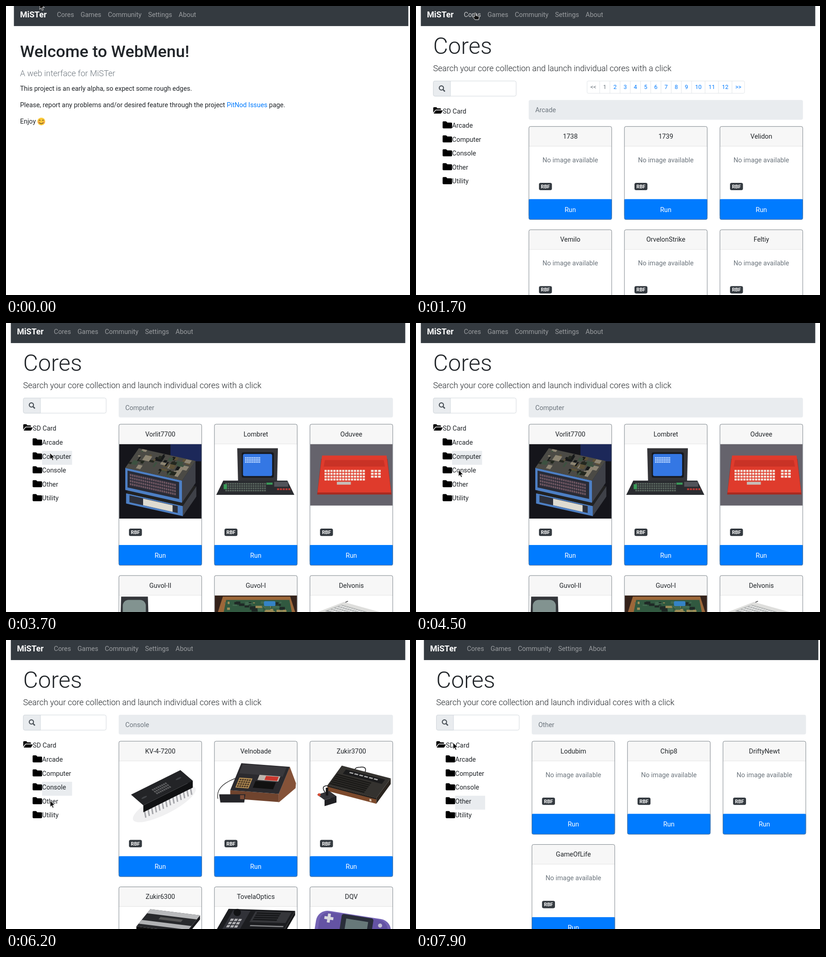
These frames come from a looping animation (884 by 634 pixels, 8000 ms). An HTML page:

```html
<!DOCTYPE html>
<html lang="en">
<head>
<meta charset="utf-8">
<title>WebMenu</title>
<style>
html, body { margin: 0; width: 100%; height: 100%; overflow: hidden; background: #fff; }
svg { display: block; }
text { font: 16px Roboto, sans-serif; fill: #212529; white-space: pre; }
.mid { text-anchor: middle; }
.muted { fill: #6c757d; }
.link { fill: #007bff; }
.white { fill: #fff; }
.brand { font-size: 20px; font-weight: 700; fill: #fff; }
.nav { fill: rgba(255,255,255,.5); }
.h1 { font-size: 40px; font-weight: 500; }
.display { font-size: 56px; font-weight: 300; }
.lead { font-size: 20px; font-weight: 300; }
.badge { font-size: 12px; font-weight: 700; fill: #fff; }
.small { font-size: 14px; }

.page, .hover, #cursor, #arrow, #hand { animation: 8s step-end infinite; }
.page { visibility: hidden; }
#home { animation-name: home; }
#arcade { animation-name: arcade; }
#computer { animation-name: computer; }
#console { animation-name: console; }
#other { animation-name: other; }
.hover { animation-name: hover; }
#cursor { animation-name: move; }
#arrow { animation-name: arrow; }
#hand { animation-name: hand; }

@keyframes home { 0% { visibility: visible } 21.25%, to { visibility: hidden } }
@keyframes arcade { 0% { visibility: hidden } 21.25% { visibility: visible } 46.25%, to { visibility: hidden } }
@keyframes computer { 0% { visibility: hidden } 46.25% { visibility: visible } 62.5%, to { visibility: hidden } }
@keyframes console { 0% { visibility: hidden } 62.5% { visibility: visible } 81.25%, to { visibility: hidden } }
@keyframes other { 0% { visibility: hidden } 81.25%, to { visibility: visible } }
@keyframes hover { 0% { fill: rgba(255,255,255,.5) } 13.75% { fill: rgba(255,255,255,.75) } 45%, to { fill: rgba(255,255,255,.5) } }
@keyframes arrow { 0% { visibility: visible } 13.75% { visibility: hidden } 27.5%, to { visibility: visible } }
@keyframes hand { 0% { visibility: hidden } 13.75% { visibility: visible } 27.5%, to { visibility: hidden } }
@keyframes move {
  0%, 7.5% { transform: translate(73.5px, -7px); animation-timing-function: steps(7) }
  16.25%, 26.25% { transform: translate(129.5px, 15px); animation-timing-function: steps(3) }
  30%, 31.25% { transform: translate(107px, 165px); animation-timing-function: steps(6) }
  38.75% { transform: translate(95.5px, 281px) }
  41.25%, 50% { transform: translate(96px, 285px); animation-timing-function: steps(3) }
  53.75% { transform: translate(92.5px, 320px) }
  56.25%, 67.5% { transform: translate(93px, 322px); animation-timing-function: steps(4) }
  72.5% { transform: translate(91.5px, 330px); animation-timing-function: steps(4) }
  77.5%, 90% { transform: translate(96.5px, 352px); animation-timing-function: steps(5) }
  96.25% { transform: translate(75.5px, 242px); animation-timing-function: steps(2) }
  98.75%, to { transform: translate(81px, 225px) }
}
</style>
</head>
<body>
<svg id="stage" width="884" height="634" viewBox="0 0 884 634"></svg>
<script>
// The page is laid out at 960 wide, then scaled onto the stage.
const SCALE = 0.899, TOP = -6.3, NARROW = 10.6, WIDE = 17.3;
const COL = 232.5, CARD = 202.5, MAIN = 262.5, BODY = 189.5;

const text = (x, y, s, cls = '') => `<text x="${x}" y="${y}" class="${cls}">${s}</text>`;
const bar = (x, y, w, h, fill, rx = 0) => `<rect x="${x}" y="${y}" width="${w}" height="${h}" rx="${rx}" fill="${fill}"/>`;
const frame = (x, y, w, h, fill, stroke, rx = 4) =>
  `<rect x="${x + .5}" y="${y + .5}" width="${w - 1}" height="${h - 1}" rx="${rx}" fill="${fill}" stroke="${stroke}"/>`;
const path = (d, fill, more = '') => `<path d="${d}" fill="${fill}" ${more}/>`;
const line = (d, color, w = 1) => path(d, 'none', `stroke="${color}" stroke-width="${w}"`);
const poly = (pts, fill) => `<polygon points="${pts.join(' ')}" fill="${fill}"/>`;
const dot = (x, y, r, fill) => `<circle cx="${x}" cy="${y}" r="${r}" fill="${fill}"/>`;
const repeat = (n, f) => Array.from({ length: n }, (_, i) => f(i)).join('');
const add = (a, b) => [a[0] + b[0], a[1] + b[1]];

let seed = 7;
const random = () => (seed = seed * 16807 % 2147483647) / 2147483647;

// --- Page parts ---

const navbar = () => bar(0, 0, 960, 56, '#343a40') + text(15, 35, 'MiSTer', 'brand') +
  text(104.8, 34, '<tspan class="hover">Cores</tspan>' +
    ['Games', 'Community', 'Settings', 'About'].map(s => `<tspan dx="16">${s}</tspan>`).join(''), 'nav');

const page = (id, left, content) => `<g class="page" id="${id}">` +
  `<g transform="translate(${left} ${TOP}) scale(${SCALE})">${navbar()}${content}</g></g>`;

const FOLDER = 'M2 0H8.5L11.5 2.9H21Q23 2.9 23 4.9V15.3Q23 17.3 21 17.3H2Q0 17.3 0 15.3V2Q0 0 2 0Z';
const OPEN = 'M0 13.5V2Q0 0 2 0H7.6L10 2.6H17Q18.8 2.6 18.8 4.5V6.1H6.7Q4.8 6.1 3.8 7.8Z' +
  'M1 15.6L5.1 8.8Q5.8 7.6 7 7.6H22Q23.6 7.6 22.7 9.2L19.6 14.5Q18.9 15.6 17.8 15.6Z';

function sidebar(active) {
  const rows = ['Arcade', 'Computer', 'Console', 'Other', 'Utility'].map((name, i) => {
    const y = 285 + 34 * i;
    return (name === active ? bar(76, y, 73, 34, '#e9ecef') : '') +
      path(FOLDER, '#000', `transform="translate(53 ${y + 3.5})"`) + text(76.2, y + 19, name);
  });
  return frame(30, BODY, CARD, 38, '#fff', '#ced4da') +
    path(`M72 ${BODY + .5}H34Q30.5 ${BODY + .5} 30.5 ${BODY + 4}V${BODY + 34}q0 3.5 3.5 3.5H72Z`, '#e9ecef', 'stroke="#ced4da"') +
    `<g fill="none" stroke="#495057"><circle cx="50" cy="207" r="5.2" stroke-width="2.4"/>` +
    '<path d="M54 211l4.5 4.5" stroke-width="3"/></g>' +
    path(OPEN, '#000', 'transform="translate(30.2 254)"') + text(53.3, 270, 'SD Card') + rows.join('');
}

function pager() {
  const labels = ['<<', ...Array.from({ length: 12 }, (_, i) => `${i + 1}`), '>>'];
  const widths = labels.map(s => 17 + s.length * (isNaN(s) ? 7.1 : 7.86));
  const total = widths.reduce((a, b) => a + b);
  let x = MAIN + (930 - MAIN - total) / 2, out = frame(x, BODY, total, 31, '#fff', '#dee2e6', 3);
  labels.forEach((s, i) => {
    if (i) out += bar(x - .5, BODY, 1, 31, '#dee2e6');
    out += text(x + widths[i] / 2, 210, s.replace(/</g, '&lt;'), 'mid small ' + (i < 2 ? 'muted' : 'link'));
    x += widths[i];
  });
  return out;
}

function card(x, y, h, title, image) {
  const mid = x + CARD / 2, end = y + h;
  return bar(x, y, CARD, h, '#fff', 4) + bar(x, y, CARD, 48, '#f7f7f7', 4) +
    bar(x, y + 48, CARD, 1, '#dfdfdf') + text(mid, y + 30, title, 'mid') +
    (image ? `<svg x="${x + 1}" y="${y + 49}" width="${CARD - 2}" height="182">${image}</svg>`
      : text(mid, y + 88, 'No image available', 'mid muted')) +
    bar(x + 25, end - 90, 31.5, 18, '#343a40', 4) + text(x + 40.7, end - 76.7, 'RBF', 'mid badge') +
    bar(x, end - 50, CARD, 40, '#007bff') + bar(x, end - 50, CARD, 50, '#007bff', 4) +
    text(mid, end - 19, 'Run', 'mid white') + frame(x, y, CARD, h, 'none', '#6c757d');
}

function coresPage(id, left, name, h, titles, images = []) {
  const paged = id === 'arcade', y = BODY + (paged ? 47 : 0);
  const cards = titles.map((s, i) =>
    card(MAIN + COL * (i % 3), y + 64 + (h + 24) * Math.floor(i / 3), h, s, images[i]));
  return page(id, left, text(30, 123.5, 'Cores', 'display') +
    text(30, 166, 'Search your core collection and launch individual cores with a click', 'lead') +
    sidebar(paged ? '' : name) + (paged ? pager() : '') +
    bar(MAIN, y, 930 - MAIN, 48, '#e9ecef', 4) + text(MAIN + 16, y + 30, name, 'muted') + cards.join(''));
}

const smiley = `<g transform="translate(66.7 288.8)">` + dot(0, 0, 9.4, '#fcc93a') +
  dot(-6, 2, 2.2, '#f79a55') + dot(6, 2, 2.2, '#f79a55') +
  line('M-6-2q2-3 4 0M2-2q2-3 4 0M-5 3q5 5 10 0', '#5d4020', 1.3) + '</g>';

const homePage = () => page('home', WIDE, text(15, 131.5, 'Welcome to WebMenu!', 'h1') +
  text(15, 178, 'A web interface for MiSTer', 'lead muted') +
  text(15, 214, 'This project is an early alpha, so expect some rough edges.') +
  text(15, 254, 'Please, report any problems and/or desired feature through the project ' +
    '<tspan class="link">PitNod Issues</tspan> page.') + text(15, 294, 'Enjoy') + smiley);

// --- Pictures of machines ---

// Maps the unit square onto the parallelogram at p spanned by u and v.
const plane = (p, u, v, content) => `<g transform="matrix(${[...u, ...v, ...p]})">${content}</g>`;

// A box seen from above: its top is p, u, v and it is d deep; "on" and "face" fill unit squares.
function slab({ p, u, v, d, top, front, side, on = '', face = '' }) {
  const b = add(p, u), c = add(b, v), a = add(p, v), drop = [0, d];
  return poly([b, c, add(c, drop), add(b, drop)], side) + poly([a, c, add(c, drop), add(a, drop)], front) +
    poly([p, b, c, a], top) + plane(p, u, v, on) + plane(a, u, drop, face);
}

const trapezoid = (x, y, w, h, inset, fill) => poly([[x + inset, y], [x + w - inset, y], [x + w, y + h], [x, y + h]], fill);

const grid = (cols, rows, x, y, w, h, fill) => repeat(cols * rows, i =>
  bar(x + w / cols * (i % cols), y + h / rows * Math.floor(i / cols), w / cols * .75, h / rows * .7, fill));

const clutter = (n, fills) => repeat(n, i =>
  bar(random() * .88, random() * .75, .02 + random() * .1, .05 + random() * .2, fills[i % fills.length]));

const chassis = { u: [138, 31], v: [-33, 48], side: '#3f4148', front: '#4d7fc4' };
const rack = bar(0, 0, 202, 182, '#15151b') + bar(125, 0, 77, 42, '#1c2859') +
  slab({ ...chassis, p: [50, 72], d: 25, top: '#222', face: bar(.06, .12, .85, .68, '#2d303a') + bar(.3, .15, .52, .65, '#dedbd1') }) +
  slab({ ...chassis, p: [48, 10], d: 54, top: '#4b4a45',
    on: clutter(60, ['#23271f', '#8d8573', '#5d5238', '#3d5140', '#17191a']),
    face: bar(.04, .1, .91, .76, '#292b36') + grid(22, 4, .08, .22, .82, .55, '#6d5560') });

const desktop = trapezoid(57, 10, 95, 82, -2, '#343438') + bar(66, 20, 78, 62, '#17191e', 4) +
  bar(69, 24, 71, 54, '#3477e4', 4) + grid(9, 3, 74, 32, 38, 15, '#bad6ff') +
  trapezoid(4, 89, 190, 35, 17, '#2a2c30') + grid(18, 4, 26, 95, 100, 22, '#59665e') +
  bar(22, 98, 8, 12, '#3a9b58') + bar(126, 94, 15, 5, '#3a9b58') + bar(145, 92, 34, 12, '#52545a') + grid(5, 1, 152, 108, 34, 6, '#b73a35');

const redBoard = bar(0, 0, 202, 150, '#65636c') + trapezoid(17, 36, 181, 87, 10, '#a82a20') +
  trapezoid(18, 28, 179, 90, 11, '#df3b2c') + trapezoid(33, 39, 149, 16, 3, '#c93226') +
  grid(14, 4, 35, 63, 100, 28, '#f3e8df') + grid(3, 3, 148, 63, 26, 21, '#f3e8df') + bar(65, 92, 34, 7, '#c6bdb7');

const monitor = trapezoid(2, 3, 71, 90, 3, '#34363a') + bar(9, 11, 56, 80, '#829390', 14);

const board = bar(0, 0, 202, 60, '#34221a') + trapezoid(4, 3, 196, 50, 16, '#9c6739') + trapezoid(20, 11, 170, 40, 8, '#315940') +
  plane([24, 14], [160, 0], [0, 34], clutter(45, ['#1f2926', '#41694f', '#9d8c56'])) + bar(120, 14, 28, 12, '#3583c5', 3);

const paleBoard = line('M82 32Q76 20 92 14', '#45464a', 2) +
  slab({ p: [82, 16], u: [85, 24], v: [-62, 24], d: 12, top: '#dededc', front: '#c4c4c2', side: '#b4b4b2',
    on: bar(.08, .2, .85, .65, '#a7aaaa') + grid(12, 4, .1, .24, .8, .56, '#eee') });

const chip = '<ellipse cx="110" cy="105" rx="85" ry="24" fill="#f0f0f1" transform="rotate(-27 110 105)"/>' +
  repeat(14, i => line(`M${62 + i * 8.6} ${122 - i * 4.3}l3 16`, '#a5a6aa', 3.5)) +
  slab({ p: [29, 82], u: [120, -60], v: [30, 26], d: 17, top: '#232427', front: '#101113', side: '#151618',
    on: dot(.13, .55, .055, '#414347') + dot(.85, .45, .055, '#414347') + grid(8, 3, .34, .3, .3, .5, '#5d5e60') });

const woodSide = poly([[183, 14], [198, 54], [197, 66], [156, 101], [156, 81]], '#855238');
const keypadConsole = line('M8 92Q0 55 70 36', '#333', 1.5) + woodSide +
  slab({ p: [65, 5], u: [118, 9], v: [-27, 66], d: 20, top: '#2b2a2e', front: '#70442e', side: '#855238',
    on: bar(.04, .03, .9, .34, '#39383c') + bar(.08, .52, .27, .37, '#b58f55') + grid(5, 4, .1, .56, .24, .32, '#4b3826') +
      bar(.43, .6, .42, .25, '#111') + bar(.46, .37, .43, .19, '#bdb6ae') + bar(.6, .39, .26, .15, '#c8362d') }) +
  trapezoid(14, 81, 58, 20, -3, '#252529') + bar(62, 83, 10, 10, '#7d4b36');

const stickConsole = line('M112 30Q103 15 121 15Q140 12 133 29M44 60Q25 59 36 76', '#28282a', 2) +
  slab({ p: [77, 11], u: [119, 31], v: [-35, 48], d: 14, top: '#34322f', front: '#7d4a2c', side: '#2a2520',
    on: grid(1, 6, .02, .4, .94, .55, '#1b1a18') + bar(.12, .12, .8, .22, '#1b1b1c') + grid(6, 1, .22, .18, .6, .08, '#aaa'),
    face: bar(0, 0, 1, .25, '#22201e') + bar(.86, .45, .04, .4, '#d8c7b4') }) +
  slab({ p: [17, 82], u: [29, -9], v: [18, 13], d: 15, top: '#333337', front: '#202023', side: '#17171a' }) +
  line('M41 84V65', '#171719', 6) + dot(22, 82, 3.5, '#d54a32');

const silverConsole = slab({ p: [76, 6], u: [121, 15], v: [-34, 42], d: 10, top: '#28292c', front: '#111', side: '#1c1c1f',
  on: bar(0, 0, 1, .24, '#b9babc') + bar(.3, .34, .45, .14, '#555') + bar(0, .62, 1, .22, '#b1b2b4') });

const knobConsole = slab({ p: [34, 5], u: [162, 5], v: [-30, 52], d: 10, top: '#1c1d20', front: '#111', side: '#17181a',
  on: bar(.42, .08, .54, .5, '#35363a') + grid(1, 4, .45, .12, .48, .4, '#17181a') + bar(.46, .72, .5, .05, '#88898c') +
    bar(.08, .06, .26, .9, '#313238') + grid(3, 3, .12, .45, .18, .45, '#b4b4b7') }) + dot(55, 14, 9, '#121315');

const handheld = '<g transform="rotate(9 20 10)">' + bar(18, 6, 184, 110, '#7463b5', 28) + bar(26, 9, 168, 100, '#6453a4', 24) +
  bar(78, 8, 78, 80, '#292d39', 5) + bar(90, 18, 54, 60, '#677879') +
  bar(37, 20, 22, 7, '#d9d9df') + bar(44.5, 12.5, 7, 22, '#d9d9df') + dot(174, 22, 5, '#c5c1d4') + '</g>';

// --- Stage ---

const outline = 'stroke="#fff" stroke-linejoin="round"';
const cursor = '<g id="cursor">' +
  path('M0 0V14.5L3.3 11.4L5.6 16.6L8.1 15.5L5.8 10.4H10.4Z', '#111', `id="arrow" ${outline}`) +
  path('M-1.5 1Q0-1.5 1.5 1V6L7 7.2Q9 7.7 8.7 10L7.6 15H-.5L-5 9.2Q-4.6 6.8-1.5 9Z', '#111', `id="hand" ${outline}`) + '</g>';

document.getElementById('stage').innerHTML = homePage() +
  coresPage('arcade', NARROW, 'Arcade', 228,
    ['1738', '1739', 'Velidon', 'Vemilo', 'OrvelonStrike', 'Feltiy']) +
  coresPage('computer', NARROW, 'Computer', 345.3,
    ['Vorlit7700', 'Lombret', 'Oduvee', 'Guvol-II', 'Guvol-I', 'Delvonis'],
    [rack, desktop, redBoard, monitor, board, paleBoard]) +
  coresPage('console', NARROW, 'Console', 331.4,
    ['KV-4-7200', 'Velnobade', 'Zukir3700', 'Zukir6300', 'TovelaOptics', 'DQV'],
    [chip, keypadConsole, stickConsole, silverConsole, knobConsole, handheld]) +
  coresPage('other', WIDE, 'Other', 228, ['Lodubim', 'Chip8', 'DriftyNewt', 'GameOfLife']) + cursor;
</script>
</body>
</html>
```
